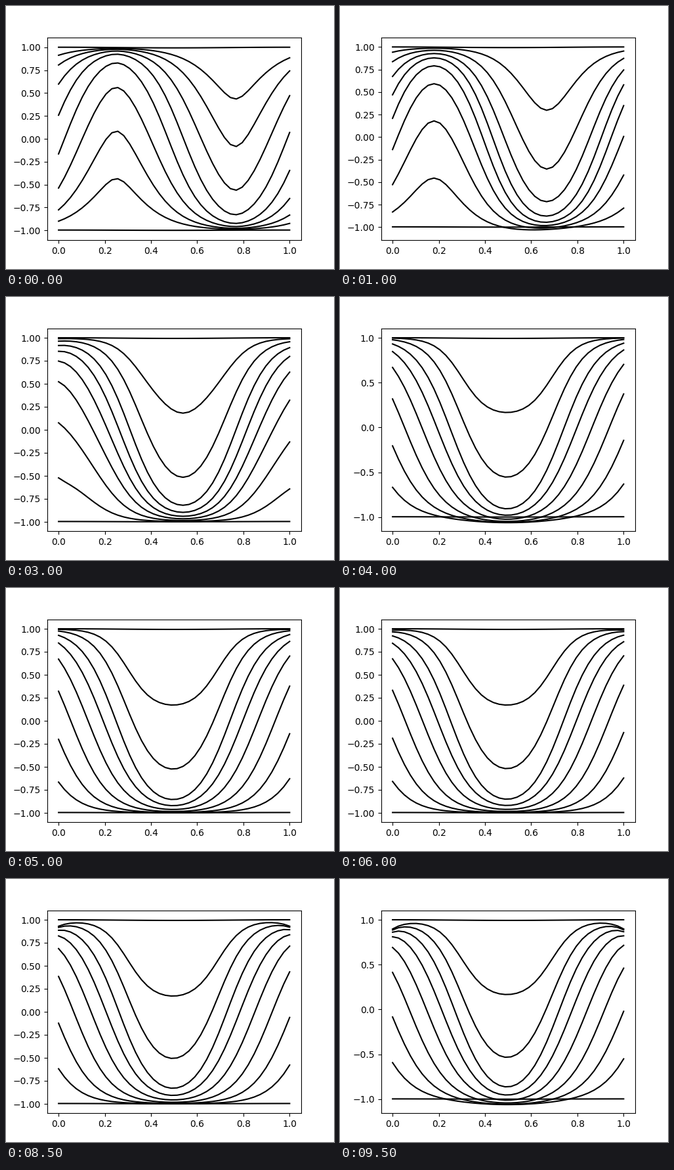
Recreate the animation shown at these times as a matplotlib script. Size 500 by 400 pixels, loop 10000 ms.

```python
import numpy as np
import matplotlib.pyplot as plt
from matplotlib.animation import FuncAnimation

FRAMES, INTERVAL = 20, 500
LINES = 10

x = np.linspace(0, 1, 40)


def mix(a, b, t):
    return a + (b - a) * t


def ease_out(t):
    return 2 * (1 - 0.5 ** np.clip(t, 0, 1))


def phases(step):
    """Progress of the drift, the opening of the valley and the late droop."""
    late = np.clip((step - 8) / 11, 0, 1) ** 2
    return ease_out(step / 4), ease_out(step / 4 - 1), late


def undershoot(step):
    """How far the valley floor sinks below -1; it swings with time."""
    return max(0, 0.053 * np.cos(2 * np.pi * (step - 8) / 5.4))


def wave(i, y, drift):
    """Rounded triangle wave with its floor at y = 0."""
    d = 4.5 - i
    period = mix(1.03, 0.94, drift)
    level = mix(0.43 * d, 0.2 * d + 0.0175 * d ** 3 - 0.15, drift)
    swing = mix(1.46 - 0.12 * abs(d), 1.25 - 0.012 * d * d, drift)
    sharp = mix(0.95, 0.8, drift)
    ramp = np.arcsin(sharp * np.cos(2 * np.pi * y / period))
    return np.tanh(level - swing * ramp / np.arcsin(sharp))


def walls(i, y, late):
    """Two mirrored walls that stand further apart on each lower curve."""
    n = i - 3
    half = max(0.195, 0.248 + 0.05 * n + 0.005 * n * n - 0.02 * late)
    steep = 6.3 + 2.7 * 0.4 ** (i - 1)
    depth = 1 - 0.56 * 0.28 ** ((i - 1) ** 2)
    return 1 - depth * (np.tanh(steep * (half + y))
                        + np.tanh(steep * (half - y)))


def curve(i, step):
    bow = np.sin(np.pi * x) ** 2
    if i == 0:
        return 1 - 0.007 * bow
    if i == LINES - 1:
        return -0.996 - 0.003 * bow
    drift, opening, late = phases(step)
    y = x - (0.765 - 0.165 * drift - 0.105 * opening)
    u = mix(wave(i, y, drift), walls(i, y, late), opening)
    edges = np.exp(-x / 0.06) + np.exp((x - 1) / 0.06)
    u = u - 0.1 * late * edges * ((1 + u) / 2) ** 6
    return u - 1.2 * undershoot(step) * bow * ((1 - u) / 2) ** 3


fig, ax = plt.subplots(figsize=(5, 4), dpi=100)
lines = [ax.plot(x, 0 * x, color="black")[0] for _ in range(LINES)]
ax.set_xlim(-0.05, 1.05)


def update(step):
    for i, line in enumerate(lines):
        line.set_ydata(curve(i, step))
    spare = 0.005 * (1 - phases(step)[0])
    low, high = -1 - max(undershoot(step), spare), 1 + spare
    margin = 0.05 * (high - low)
    ax.set_ylim(low - margin, high + margin)
    return lines


anim = FuncAnimation(fig, update, frames=FRAMES, interval=INTERVAL,
                     repeat=True, repeat_delay=0)
plt.show()
```
